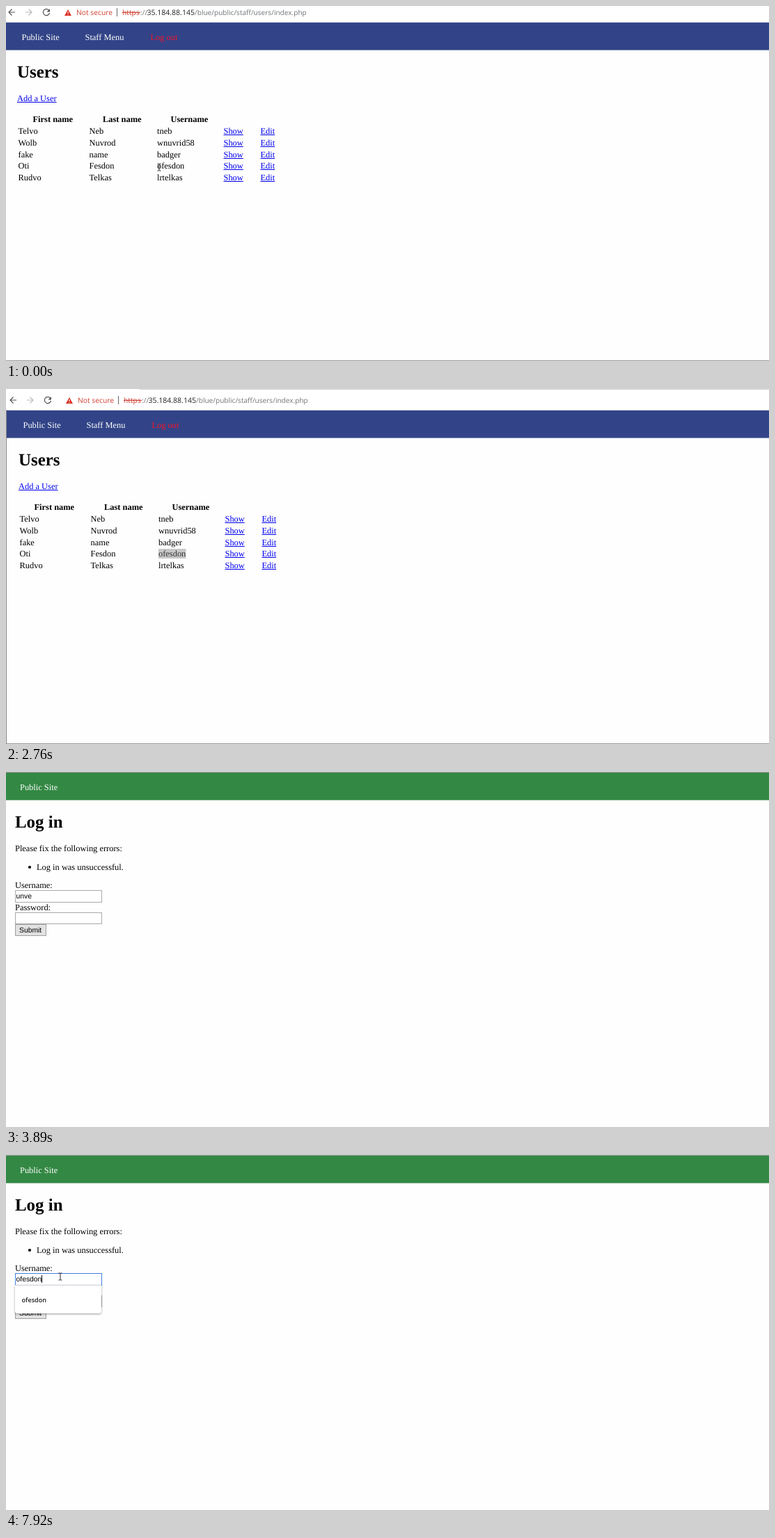
These frames come from a looping animation (1096x511 px, 8000 ms). An HTML page with a canvas:

```html
<!DOCTYPE html>
<html lang="en">
<head>
<meta charset="utf-8">
<title>Users and log in</title>
<style>
html, body { margin: 0; height: 100%; overflow: hidden; background: #fefefe; }
canvas { display: block; }
</style>
</head>
<body>
<canvas width="1096" height="511"></canvas>
<script>
const ctx = document.querySelector('canvas').getContext('2d');
ctx.textRendering = 'geometricPrecision';
const LOOP = 8000, W = 1096, H = 511;
const SERIF = '12.43px "Liberation Serif", serif';
const BOLD = 'bold ' + SERIF;
const HEADING = 'bold 24.9px "Liberation Serif", serif';
const ARIAL = '10.36px "Liberation Sans", sans-serif';
const ui = size => size + 'px "Open Sans", sans-serif';
const LINK = '#0000ee', SELECT = '#3390ff';

const people = [
  ['Telvo', 'Neb', 'tneb'],
  ['Wolb', 'Nuvrod', 'wnuvrid58'],
  ['fake', 'name', 'badger'],
  ['Oti', 'Fesdon', 'ofesdon'],
  ['Rudvo', 'Telkas', 'lrtelkas']
];
const typed = 'ofesdon', oldName = 'unve';
const keyTimes = [6600, 6720, 6870, 7020, 7180, 7310, 7460];

// [time, x, y] of the page inside the stage
const pans = [[0, 0, 0], [2630, 1, 4], [2760, 2, 7], [2910, 3, -6], [3030, 3, -17], [3180, 0, -21], [3310, -2.5, -23]];

// [time, shape, x, y]
const pointer = [
  [0, 'beam', 220, 232], [140], [670, 'arrow', 257.5, 231], [950, 'arrow', 257, 226],
  [1100, 'arrow', 235, 130], [1230, 'arrow', 197, 36], [1380, 'arrow', 197, 57],
  [1510, 'arrow', 197, 55], [1650, 'arrow', 193, 49], [1800, 'arrow', 185, 25],
  [1920, 'beam', 181, 7], [2040, 'beam', 178, 5], [2160, 'beam', 176, 2],
  [2310, 'beam', 176, -3], [2460],
  [4290, 'arrow', 163, 56], [4420, 'beam', 116, 143], [4570, 'beam', 75, 175], [7920, 'beam', 78, 175]
];

const latest = (steps, t) => steps.filter(s => s[0] <= t).pop();

function rect(x, y, w, h, color) {
  ctx.fillStyle = color;
  ctx.fillRect(x, y, w, h);
}

function frame(x, y, w, h, color) {
  ctx.strokeStyle = color;
  ctx.lineWidth = 1;
  ctx.strokeRect(x + .5, y + .5, w - 1, h - 1);
}

function text(str, x, y, font = SERIF, color = '#000') {
  ctx.font = font;
  ctx.fillStyle = color;
  ctx.fillText(str, x, y);
  return ctx.measureText(str).width;
}

function link(str, x, y) {
  const width = text(str, x, y, SERIF, LINK);
  rect(x, Math.round(y + 1), width, 1, LINK);
}

function stroke(path, color, width = 1.2) {
  ctx.strokeStyle = color;
  ctx.lineWidth = width;
  ctx.stroke(new Path2D(path));
}

function browserBar(t) {
  rect(0, -10, W, 34, '#fff');
  rect(190, -7, W, 1, '#d5d5d5');
  if (t >= 1920 && t < 2310) rect(176, 1, 20, 16, '#f0f0f0');
  stroke('M13 9H4M8.5 4.5L4 9l4.5 4.5', '#555');
  stroke('M28 9h9M32.5 4.5L37 9l-4.5 4.5', '#bbb');
  stroke('M61.5 6A4.6 4.6 0 1 0 62.5 10', '#555');
  ctx.fillStyle = '#555';
  ctx.fill(new Path2D('M63 4v4.5h-4.5z'));
  ctx.fillStyle = '#d93025';
  ctx.fill(new Path2D('M89 5l5 9h-10z'));
  rect(88.5, 8, 1, 3, '#fff');
  rect(88.5, 12, 1, 1, '#fff');
  text('Not secure', 101, 13, ui(10.3), '#d23f31');
  rect(159, 3, 1, 12, '#666');
  text('https', 167, 13, ui(10.3), '#d23f31');
  rect(167, 9, 26, 1, '#d23f31');
  text('://', 193, 13, ui(10.1), '#777');
  text('35.184.88.145', 202.5, 13, ui(10.5), '#222');
  text('/blue/public/staff/users/index.php', 271, 13, ui(10.08), '#707478');
}

function usersPage(t) {
  const [, dx, dy] = latest(pans, t);
  ctx.save();
  ctx.translate(dx, dy);
  browserBar(t);
  rect(-5, 23.7, W + 10, 39.8, '#324487');
  text('Public Site', 22.5, 48.5, SERIF, '#fff');
  text('Staff Menu', 113.5, 48.5, SERIF, '#fff');
  text('Log out', 207.5, 48.5, SERIF, '#f5142d');
  text('Users', 16, 103, HEADING);
  link('Add a User', 16, 137);
  text('First name', 38.5, 167, BOLD);
  text('Last name', 139, 167, BOLD);
  text('Username', 236.5, 167, BOLD);
  people.forEach(([first, last, user], i) => {
    const y = 184 + 16.75 * i;
    const selected = i === 3 && t >= 550, focused = t < 2630;
    if (selected) rect(217, 223, 39.5, 14, focused ? SELECT : '#c8c8c8');
    text(first, 17.5, y);
    text(last, 119.5, y);
    text(user, 217, y, SERIF, selected ? (focused ? '#fff' : '#333') : '#000');
    link('Show', 312.5, y);
    link('Edit', 365.5, y);
  });
  ctx.restore();
  if (dy >= 0) rect(0, 510, W, 1, '#999');
  else rect(0, 0, W, 1, '#999');
  if (dy > 0) rect(0, 30, 1, H, '#888');
}

function suggestions(names) {
  const height = 13 + 28 * names.length;
  ctx.save();
  ctx.shadowColor = 'rgba(0,0,0,.4)';
  ctx.shadowBlur = 3;
  ctx.shadowOffsetY = 1;
  ctx.fillStyle = '#fff';
  ctx.beginPath();
  ctx.roundRect(13, 187, 124, height, [0, 0, 3, 3]);
  ctx.fill();
  ctx.restore();
  rect(13, 187, 124, 1, '#d0d4da');
  names.forEach((name, i) => text(name, 22.5, 211.5 + 28 * i, '600 ' + ui(9.15), '#222'));
}

function loginPage(t) {
  const focused = t >= 4980, selected = t >= 5380 && t < keyTimes[0];
  const keys = keyTimes.filter(k => k <= t).length;
  const value = keys ? typed.slice(0, keys) : oldName;
  rect(0, 1, W, 39.5, '#338844');
  rect(0, 0, W, 1, '#999');
  text('Public Site', 20, 25.5, SERIF, '#fff');
  text('Log in', 13, 80, HEADING);
  text('Please fix the following errors:', 13, 114);
  ctx.beginPath();
  ctx.arc(34, 137, 2.1, 0, 7);
  ctx.fill();
  text('Log in was unsuccessful.', 44, 140.5);
  text('Username:', 13, 167);
  text('Password:', 13, 199);
  frame(13, 202, 125, 17, '#aaa');
  rect(13, 219, 45, 17, '#e2e2e2');
  frame(13, 219, 45, 17, '#a0a0a0');
  text('Submit', 19, 230.5, ARIAL);
  rect(13, 170, 125, 17, '#fff');
  frame(13, 170, 125, 18, focused ? '#3f7fe0' : '#aaa');
  if (selected) rect(15, 172, 22.5, 13, SELECT);
  const width = text(value, 14.5, 182, ARIAL, selected ? '#fff' : '#000');
  if (selected) stroke('M15 184.5' + 'l1.5 -1l1.5 1'.repeat(7), '#d04050', .8);
  if (focused && !selected) rect(Math.round(14.5 + width), 173, 1, 11, '#000');
  if (focused) suggestions(keys ? [typed] : [oldName, oldName + '.tresbo']);
}

function drawPointer(t) {
  const [, shape, x, y] = latest(pointer, t);
  if (!shape) return;
  ctx.save();
  ctx.translate(x, y);
  if (shape === 'beam') {
    stroke('M-2.5 -5h2l.5 .5l.5 -.5h2M0 -4.5v9M-2.5 5h2l.5 -.5l.5 .5h2', '#222', 1);
  } else {
    const arrow = new Path2D('M.5 .5v11l2.5 -2.3l1.7 3.8l1.6 -.7l-1.7 -3.7h3.4z');
    ctx.fillStyle = '#fff';
    ctx.fill(arrow);
    ctx.strokeStyle = '#000';
    ctx.lineWidth = .8;
    ctx.stroke(arrow);
  }
  ctx.restore();
}

function draw(now) {
  const t = now % LOOP;
  rect(0, 0, W, H, '#fefefe');
  (t < 3890 ? usersPage : loginPage)(t);
  drawPointer(t);
  requestAnimationFrame(draw);
}
requestAnimationFrame(draw);
</script>
</body>
</html>
```
